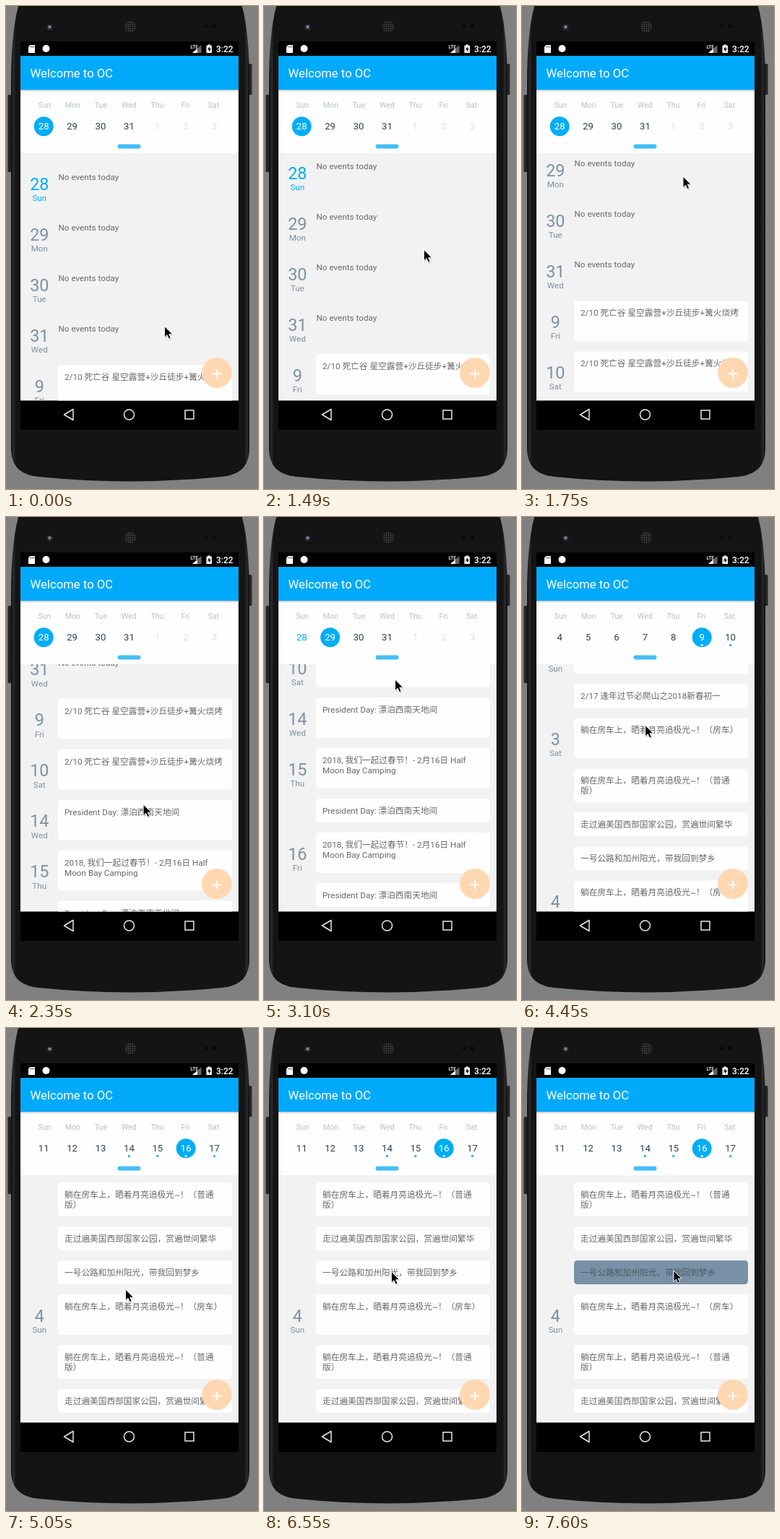
Write an HTML page that moves like this. It is 349 px wide and 669 px high and loops after 8 s.

```html
<!DOCTYPE html>
<html lang="en">
<head>
<meta charset="utf-8">
<title>Agenda</title>
<style>
html, body { margin: 0; width: 100%; height: 100%; overflow: hidden; background: #808080; }
svg { display: block; width: 349px; height: 669px; }
text { font-family: Roboto, "Noto Sans CJK SC", "Noto Sans CJK", sans-serif; font-size: 11.7px; white-space: pre; }
.mid { text-anchor: middle; }
.item { fill: #686868; }
.num { font-size: 23.4px; }
.day { font-size: 13.2px; }
.head { font-size: 10.6px; fill: #b6c1cd; }
</style>
</head>
<body>
<svg viewBox="0 0 349 669" xmlns="http://www.w3.org/2000/svg">
  <defs>
    <linearGradient id="rim">
      <stop offset="0" stop-color="#0b0b0b"/><stop offset=".01" stop-color="#2b2b2b"/>
      <stop offset=".02" stop-color="#141414"/><stop offset=".98" stop-color="#141414"/>
      <stop offset=".99" stop-color="#2b2b2b"/><stop offset="1" stop-color="#0b0b0b"/>
    </linearGradient>
    <linearGradient id="drop" x2="0" y2="1">
      <stop offset="0" stop-color="#000" stop-opacity=".24"/><stop offset="1" stop-color="#000" stop-opacity="0"/>
    </linearGradient>
    <pattern id="mesh" width="3" height="3" patternUnits="userSpaceOnUse">
      <rect width="3" height="3" fill="#161616"/><circle cx="1.5" cy="1.5" r=".9" fill="#4c4c4c"/>
    </pattern>
    <clipPath id="listClip"><rect x="20" y="204" width="302" height="342.5"/></clipPath>
    <clipPath id="weekClip"><rect x="20" y="151" width="302" height="33"/></clipPath>
  </defs>

  <rect width="349" height="669" fill="#808080"/>
  <rect x="2.5" y="123" width="6" height="107" rx="1.5" fill="#252525"/>
  <rect x="335" y="80" width="5.5" height="43" rx="1.5" fill="#252525"/>
  <path d="M7 110Q7 30 19 -6H325Q337 30 337 110V612C337 636 326 649 299 652Q234 658.5 172 658.5Q110 658.5 45 652C18 649 7 636 7 612Z" fill="url(#rim)"/>
  <circle cx="60.5" cy="29.5" r="4.5" fill="#24242a"/>
  <circle cx="60.5" cy="29" r="2.2" fill="#80809c"/>
  <circle cx="172" cy="28.5" r="8" fill="url(#mesh)"/>
  <circle cx="277" cy="28" r="2.5" fill="#0a0a0a"/>
  <circle cx="288" cy="28" r="3" fill="#0a0a0a"/>

  <rect x="20" y="49" width="302" height="538"/>
  <path d="M33.5 54H40V65H31V56.5Z" fill="#fff"/>
  <path d="M34.5 55.5v2M36.5 55.5v2M38.5 55.5v2" stroke="#000" stroke-width=".8"/>
  <circle cx="55.5" cy="59" r="5" fill="#fff"/>
  <text x="255.5" y="58.5" fill="#fff" style="font-size:6.5px;font-weight:500">LTE</text>
  <path d="M270.5 54V65H258Z" fill="#666"/>
  <path d="M265 59V65H258Z" fill="#fff"/>
  <path d="M279.5 53.5h3.5v1.2h2V65h-7.5V54.7h2Z" fill="#fff"/>
  <path d="M282 56l-3 4.500h2V63.500l3-4.500h-2Z"/>
  <text x="291" y="63.5" fill="#fff" style="font-size:12px;font-weight:500">3:22</text>

  <rect x="20" y="204" width="302" height="342.5" fill="#f2f2f2"/>
  <g clip-path="url(#listClip)"><g id="list"></g></g>
  <rect x="20" y="115" width="302" height="89" fill="#fefefe"/>
  <rect x="20" y="69" width="302" height="47" fill="#00aafb"/>
  <rect x="20" y="116" width="302" height="3" fill="url(#drop)"/>
  <text x="33.5" y="99" fill="#fff" style="font-size:16.7px">Welcome to OC</text>
  <g id="heads"></g>
  <g clip-path="url(#weekClip)"><g id="weeks"></g></g>
  <rect x="154.5" y="191.5" width="32" height="6" rx="3" fill="#43bff7"/>

  <circle cx="292" cy="508" r="21" fill="#ffd8b2"/>
  <path d="M286 509.5H298M292 503.5V515.5" stroke="#fff" stroke-width="2"/>

  <g fill="none" stroke="#e8e8e8" stroke-width="1.5">
    <path d="M93 558.5V573.5L80.5 566Z" stroke-linejoin="round"/>
    <circle cx="170.500" cy="566" r="7"/>
    <rect x="248" y="560" width="12" height="12"/>
  </g>

  <g id="cursor">
    <path d="M1 1.5V17L4.500 13.700L7 19L9.600 18L7.300 12.700H12Z" fill="#000" opacity=".2"/>
    <path d="M0 0V15.500L3.500 12.200L5.900 17.500L8.700 16.300L6.300 11.200H11.200Z" stroke="#fff" stroke-linejoin="round"/>
  </g>
</svg>
<script>
const $ = id => document.getElementById(id);
const BLUE = '#00adf5', SLATE = '#7a92a5', INK = '#2d4150';
const DAYS = ['Sun', 'Mon', 'Tue', 'Wed', 'Thu', 'Fri', 'Sat'];

function add(parent, tag, attrs, text) {
  const el = document.createElementNS('http://www.w3.org/2000/svg', tag);
  for (const k in attrs) el.setAttribute(k, attrs[k]);
  if (text !== undefined) el.textContent = text;
  parent.appendChild(el);
  return el;
}

// Event titles
const camp = '2/10 死亡谷 星空露营+沙丘徒步+篝火烧烤';
const drift = 'President Day: 漂泊西南天地间';
const spring = '2018, 我们一起过春节！- 2月16日 Half\nMoon Bay Camping';
const hike = '2/17 逢年过节必爬山之2018新春初一';
const aurora = '躺在房车上，晒着月亮追极光~！（普通\n版）';
const auroraVan = '躺在房车上，晒着月亮追极光~！（房车）';
const parks = '走过遍美国西部国家公园，赏遍世间繁华';
const coast = '一号公路和加州阳光，带我回到梦乡';

// [date, weekday, ...events]
const agenda = [
  [28, 0], [29, 1], [30, 2], [31, 3],
  [9, 5, camp], [10, 6, camp], [14, 3, drift],
  [15, 4, spring, drift], [16, 5, spring, drift, hike],
  [17, 6, spring, drift, hike], [18, 0, drift, hike],
  [3, 6, auroraVan, aurora, parks, coast],
  [4, 0, auroraVan, aurora, parks, coast]
];

let pressed;
function buildList() {
  const list = $('list');
  let y = 217;
  for (const [date, weekday, ...events] of agenda) {
    const fill = date === 28 ? BLUE : SLATE;
    add(list, 'text', { x: 46.3, y: y + 37.7, class: 'mid num', fill }, date);
    add(list, 'text', { x: 46.3, y: y + 53, class: 'mid', fill }, DAYS[weekday]);
    if (!events.length) {
      add(list, 'text', { x: 72.5, y: y + 24, class: 'item' }, 'No events today');
      y += 70;
    }
    events.forEach((title, i) => {
      const lines = title.split('\n');
      const height = i === 0 ? 56 : 19 + 14 * lines.length;
      const card = add(list, 'rect', { x: 72, y, width: 241, height, rx: 4.5, fill: '#fefefe' });
      const texts = lines.map((line, n) =>
        add(list, 'text', { x: 81, y: y + 21 + 14 * n, class: 'item' }, line));
      if (date === 3 && title === coast) pressed = { card, text: texts[0] };
      y += height + 14;
    });
  }
}

const ROLL = 36;
const columnX = i => 52.2 + 39.4 * i;
const hasEvents = day => day > 8 && agenda.some(([date, , event]) => date === day && event);

function buildWeek(n) {
  const g = add($('weeks'), 'g', { transform: `translate(0 ${n * ROLL})` });
  const disc = add(g, 'circle', { cy: 166.8, r: 13.5, fill: BLUE });
  const labels = DAYS.map((_, i) => {
    const day = (27 + 7 * n + i) % 31 + 1;
    if (n && hasEvents(day))
      add(g, 'circle', { cx: columnX(i), cy: 177.5, r: 1.6, fill: i === 5 ? '#fff' : BLUE });
    return add(g, 'text', { x: columnX(i), y: 171, class: 'mid day' }, day);
  });
  return sel => {
    disc.setAttribute('cx', columnX(sel));
    labels.forEach((el, i) => {
      const plain = n || (i > 0 && i < 4) ? INK : i ? '#d9e1e8' : BLUE;
      el.setAttribute('fill', i === sel ? '#fff' : plain);
    });
  };
}

buildList();
DAYS.forEach((d, i) => add($('heads'), 'text', { x: 53.4 + 39 * i, y: 140.5, class: 'mid head' }, d));
const [selectFirst, ...selectLater] = [0, 1, 2].map(buildWeek);
selectLater.forEach(select => select(5));

// Eased progress from 0 to 1 between two times
function ease(t, from, to) {
  const p = Math.min(1, Math.max(0, (t - from) / (to - from)));
  return p * p * (3 - 2 * p);
}

// Pointer moves: [from, to, x, y]
const moves = [
  [450, 900, 219.5, 457], [1200, 1750, 223, 236], [1750, 2550, 184, 428],
  [2650, 3100, 181.5, 225], [3100, 3700, 182.5, 343], [3700, 4150, 176, 215],
  [4150, 4750, 165.5, 362], [5200, 5800, 166, 336], [6250, 6700, 180, 338], [7150, 7600, 210, 336]
];

function cursorAt(t) {
  let x = 219.5, y = 443.5;
  for (const [from, to, nx, ny] of moves) {
    const p = ease(t, from, to);
    x += (nx - x) * p;
    y += (ny - y) * p;
  }
  return [x, y];
}

const scrollAt = t =>
  245.5 * ease(t, 1340, 2350) + 201.5 * ease(t, 2650, 3355) + 678 * ease(t, 3700, 4750);
const rollAt = t => ROLL * (ease(t, 4150, 4450) + ease(t, 4750, 5050));

function snap(t) {
  const phase = t < 1490 ? 0 : t < 1750 ? 140 : 100;
  return phase + Math.floor((t - phase) / 150) * 150;
}

function draw(time) {
  const t = snap(time);
  const place = (id, x, y) => $(id).setAttribute('transform', `translate(${x} ${y})`);
  place('list', 0, -scrollAt(t));
  place('weeks', 0, -rollAt(t));
  place('cursor', ...cursorAt(t));
  selectFirst(t < 2500 ? 0 : 1);
  const down = t >= 7600;
  pressed.card.setAttribute('fill', down ? '#7891a7' : '#fefefe');
  pressed.text.style.fill = down ? '#4d5963' : '';
}

const start = performance.now();
function tick() {
  draw((performance.now() - start) % 8000);
  requestAnimationFrame(tick);
}
tick();
</script>
</body>
</html>
```
